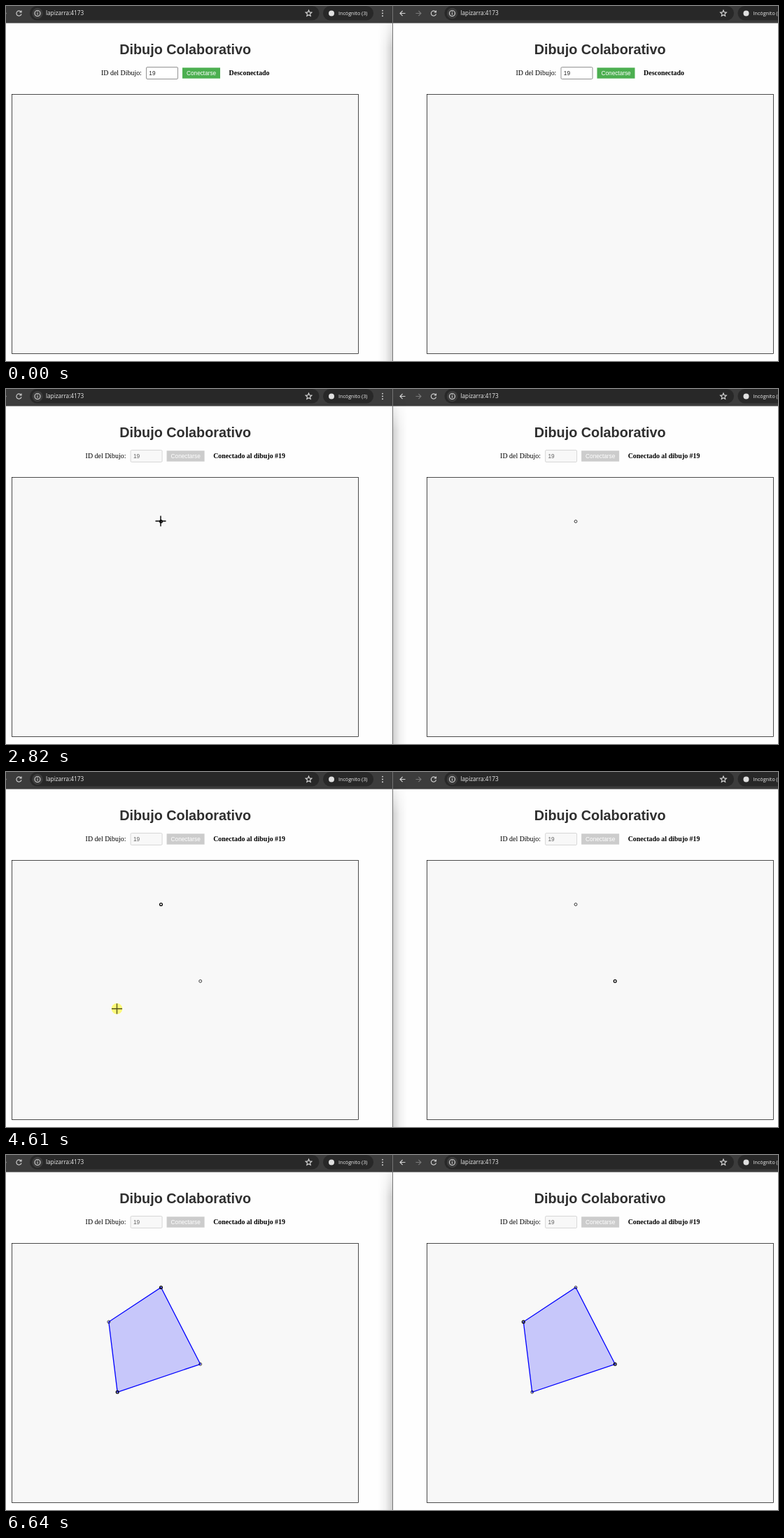
An HTML page that plays this animation: 1103x508 px, repeating every 7240 ms.

```html
<!DOCTYPE html>
<html lang="es">
<head>
<meta charset="utf-8">
<style>
  html, body { margin: 0; width: 100%; height: 100%; overflow: hidden; background: #fefefe; }
  svg { display: block; width: 1103px; height: 508px; }
  .ui { font-family: "Open Sans", sans-serif; fill: #eee; }
  .sans { font-family: "Liberation Sans", Arial, sans-serif; font-size: 8.25px; }
  .serif { font-family: "Liberation Serif", Times, serif; font-size: 9.93px; }
  .title { font: bold 19.8px "Liberation Sans", Arial, sans-serif; fill: #2f2f2f; }
  .bold { font-weight: bold; }
  .icon { fill: none; stroke: #d6d6d6; stroke-width: 1.1; }
</style>
</head>
<body>
<svg id="stage" viewBox="0 0 1103 508"></svg>
<script>
const LOOP = 7240, SHIFT = 592.5, EDGE = 552;
const stage = document.getElementById('stage');

// start time, cursor kind, x, y, pressed
const STEPS = [
  [0], [200, 'cross', 420, 150], [400, 'arrow', 300, 108], [600, 'arrow', 272, 97, 1],
  [800, 'arrow', 272, 97], [1000, 'arrow', 480, 96], [1200, 'arrow', 711, 96],
  [1400, 'arrow', 790, 97], [1600, 'arrow', 862, 97, 1], [1820, 'arrow', 866, 97],
  [2020, 'beam', 892.5, 96.5], [2220, 'arrow', 600, 112], [2420, 'cross', 303, 165],
  [2620, 'cross', 221, 189, 1], [2820, 'cross', 221, 189], [3010, 'cross', 480, 230],
  [3210, 'cross', 885, 285], [3410, 'cross', 871.5, 291.5], [3610, 'cross', 870, 299, 1],
  [3810, 'cross', 870, 299], [4010, 'cross', 690, 316], [4210, 'cross', 400, 335],
  [4410, 'cross', 180, 340], [4610, 'cross', 158.5, 338.8, 1], [4810, 'cross', 158.5, 338.8],
  [5020, 'cross', 200, 322], [5220, 'cross', 460, 276], [5440, 'cross', 738, 238.3, 1],
  [5640, 'cross', 738, 238.3], [5840, 'cross', 745, 246], [6040, 'cross', 809, 299],
  [6240, 'cross', 890, 344], [6440, 'cross', 971, 384], [6640]
];
const CONNECT = [800, 1820];            // per window
const FOCUS = [600, 1600, 2620, 3610, 4610, 5440]; // focus swaps, right window first
const POINTS = [                        // x, y, time, window that drew it
  [221.5, 189.5, 2820, 0], [277.7, 299.3, 3810, 1],
  [159.2, 339.3, 4810, 0], [146.8, 238.8, 5640, 1]
];

const rect = (x, y, w, h, fill, more = '') =>
  `<rect x="${x}" y="${y}" width="${w}" height="${h}" fill="${fill}" ${more}/>`;
const text = (x, y, cls, str, more = '') =>
  `<text x="${x}" y="${y}" class="${cls}" ${more}>${str}</text>`;
const icon = (d, more = '') => `<path class="icon" d="${d}" ${more}/>`;

function star(cx, cy) {
  let d = '';
  for (let i = 0; i < 10; i++) {
    const a = i * Math.PI / 5, r = i % 2 ? 2.1 : 4.6;
    d += `${i ? 'L' : 'M'}${(cx + r * Math.sin(a)).toFixed(2)} ${(cy - r * Math.cos(a)).toFixed(2)}`;
  }
  return icon(d + 'Z', 'stroke-width=".9"');
}

function toolbar() {
  return rect(-40.5, 0, 600, 24.5, '#3c3c3c') +
    icon('M-22 10.5h-7.5m3.6-3.6l-3.6 3.6l3.6 3.6') +
    icon('M-7 10.5h7.5m-3.6-3.6l3.6 3.6l-3.6 3.6', 'opacity=".4"') +
    icon('M21.3 8.2A3.6 3.6 0 1 0 22 11.3M22 6.4V9H19.3') +
    rect(34, 0, 413.5, 20.5, '#282828', 'rx="10"') +
    '<circle cx="45" cy="10.5" r="7.7" fill="#3c3c3c"/>' +
    icon('M41 10.5a4 4 0 1 0 8 0a4 4 0 1 0 -8 0M45 10v2.6M45 8v1') +
    text(57, 13.4, 'ui', 'lapizarra:4173', 'font-size="8.2"') +
    star(432.5, 10.6) +
    rect(453, 0, 72, 20.5, '#282828', 'rx="10"') +
    '<circle cx="465" cy="10.5" r="4" fill="#e0e0e0"/>' +
    text(475, 13.2, 'ui', 'Incógnito (3)', 'font-size="7.2" font-weight="500"') +
    [6.6, 10.4, 14.2].map(y => `<circle cx="538" cy="${y}" r=".95" fill="#ddd"/>`).join('');
}

function form(on) {
  return `<g transform="translate(${on ? -22.4 : 0})">` +
    text(136, 99, 'serif', 'ID del Dibujo:') +
    rect(200.5, 87.5, 45, 17, on ? '#f8f8f8' : '#fff', `rx="1.5" stroke="${on ? '#cfcfcf' : '#767676'}" stroke-width=".8"`) +
    text(204.3, 99, 'sans', '19', `fill="${on ? '#606060' : '#222'}"`) +
    rect(252, 88.3, 54, 15.4, on ? '#ccc' : '#4caf50') +
    text(258, 99, 'sans', 'Conectarse', 'fill="#fff"') +
    text(318.6, 99, 'serif bold', on ? 'Conectado al dibujo #19' : 'Desconectado') + '</g>';
}

function drawing(t, side) {
  const seen = POINTS.filter(p => t >= p[2]);
  const shape = seen.length < 4 ? '' :
    `<polygon points="${seen.map(p => p.slice(0, 2)).join(' ')}" fill="#00f" fill-opacity=".2" stroke="#00f" stroke-width="1.3"/>`;
  return shape + seen.map(([x, y, , owner]) =>
    `<circle cx="${x}" cy="${y}" r="1.95" fill="none" stroke="#000" stroke-width="${owner === side ? 1.2 : .75}"/>`).join('');
}

function pane(t, side) {
  return `<g transform="translate(${side * SHIFT})">` +
    rect(-40.5, 0, 600, 508, '#fefefe') + toolbar() +
    text(256.2, 68.6, 'title', 'Dibujo Colaborativo', 'text-anchor="middle"') +
    form(t >= CONNECT[side]) +
    rect(8.5 + side / 2, 126.5, 495, 371, '#f8f8f8', 'stroke="#000" stroke-width=".7"') +
    drawing(t, side) + '</g>';
}

// shadow of the focused window, weaker near its top
function shadow(t) {
  const right = FOCUS.filter(f => t >= f).length % 2 === 0;
  const [from, to] = right ? [0, 1] : [1, 0];
  return `<linearGradient id="fade" x1="${from}" x2="${to}">
    <stop offset="0" stop-opacity="0"/><stop offset=".5" stop-opacity=".05"/>
    <stop offset="1" stop-opacity=".18"/></linearGradient>
    <linearGradient id="rise" x2="0" y2="1"><stop stop-color="#000"/>
    <stop offset=".1" stop-color="#fff"/></linearGradient>
    <mask id="top">${rect(EDGE - 20, 10, 41, 498, 'url(#rise)')}</mask>` +
    rect(right ? EDGE - 20 : EDGE + 1, 10, 20, 498, 'url(#fade)', 'mask="url(#top)"') +
    rect(EDGE, 0, 1, 508, '#747474');
}

function cursor(kind, x, y, pressed) {
  if (!kind) return '';
  const glow = pressed ? `<circle cx="${x}" cy="${y}" r="7.8" fill="#fdf97a"/>` : '';
  const shapes = {
    cross: `<path d="M-7.5 0H7.5M0 -7.5V7.5" stroke="${pressed ? '#55551c' : '#000'}" stroke-width="1.4"/>`,
    beam: '<path d="M-2 -4.8H2M0 -4.8V4.8M-2 4.8H2" stroke="#222" stroke-width=".8"/>',
    arrow: '<path d="M.4 .5V10.6L2.8 8.4L4.3 11.8L5.9 11.1L4.4 7.8H7.2Z" fill="#fff" stroke="#222" stroke-width=".9"/>'
  };
  return glow + `<g transform="translate(${x} ${y})">${shapes[kind]}</g>`;
}

let last = null;
function tick(now) {
  const t = now % LOOP;
  const step = STEPS.findLast(s => t >= s[0]);
  if (step !== last) {
    last = step;
    const [time, ...pose] = step;
    stage.innerHTML = pane(time, 0) + pane(time, 1) + shadow(time) + cursor(...pose);
  }
  requestAnimationFrame(tick);
}
tick(0);
</script>
</body>
</html>
```
